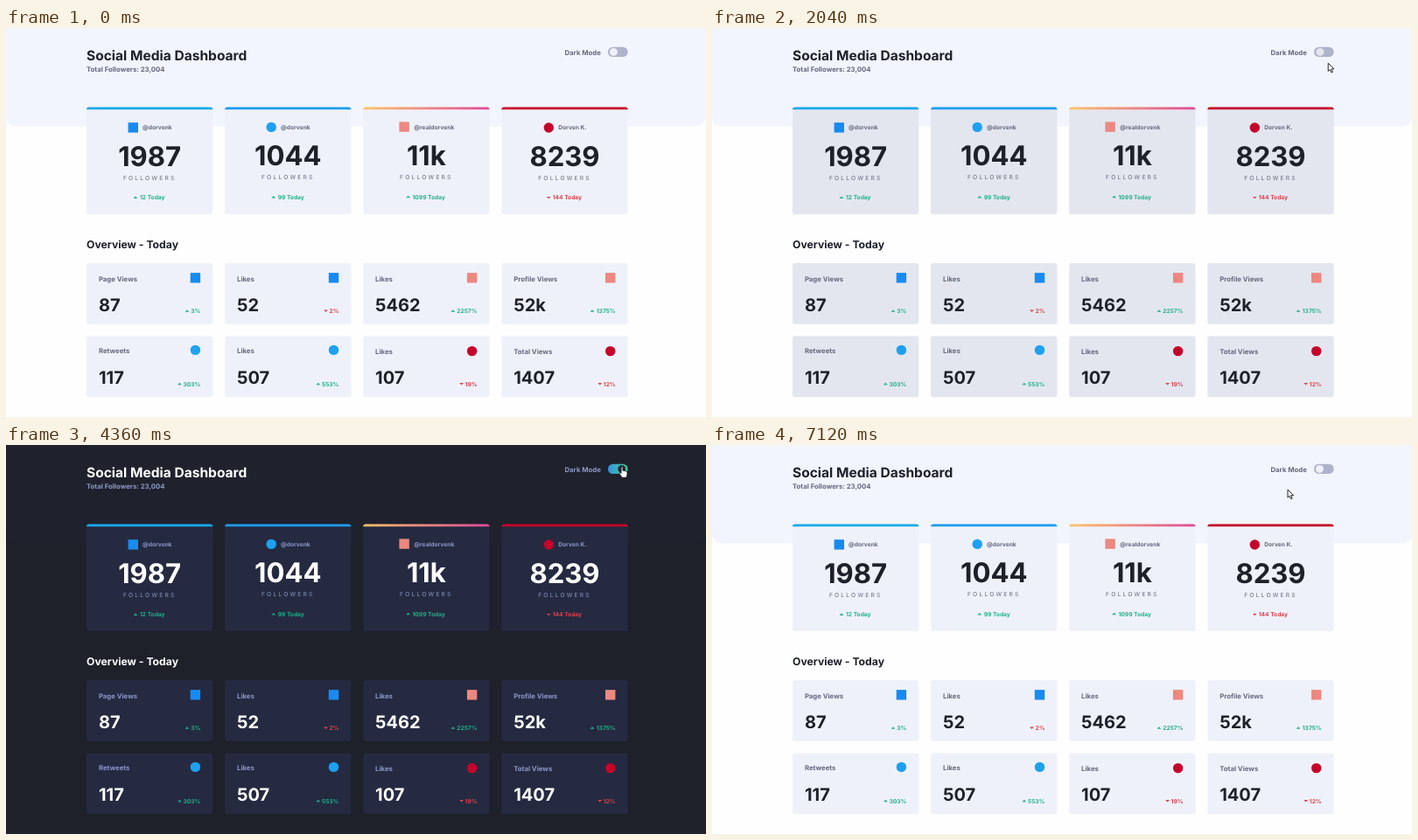
An HTML page that plays this animation: 800x445 px, repeating every 7.16 s.

```html
<!DOCTYPE html>
<html lang="en">
<head>
<meta charset="utf-8">
<title>Social Media Dashboard</title>
<style>
  html, body { margin: 0; width: 100%; height: 100%; overflow: hidden; }
  svg {
    display: block; width: 800px; height: 445px;
    font-family: Inter, sans-serif; font-weight: 700;
    text-rendering: geometricPrecision;
    --page: #fefdff; --top: #f3f5fe; --ink: #1e202a; --text: #63687e; --track: #aeb3cb;
    --up: #1fb088; --down: #dc414c;
  }
  svg.dark {
    --page: #1e202a; --top: #1f212c; --ink: #fff; --text: #8b98c9; --track: url(#trackFill);
  }
  .page { fill: var(--page); }
  .top { fill: var(--top); }
  .ink { fill: var(--ink); }
  .text { fill: var(--text); }
  .track { fill: var(--track); }
  .up { fill: var(--up); }
  .down { fill: var(--down); }
  .surface { fill: var(--surface); }
  .thin { font-weight: 400; letter-spacing: 2.22px; }
  .cursor path { fill: #fff; stroke: #111; stroke-width: .9; stroke-linejoin: round; }
</style>
</head>
<body>
<svg id="stage" viewBox="0 0 800 445">
  <defs>
    <linearGradient id="trackFill">
      <stop offset="0" stop-color="#378fe6"/><stop offset="1" stop-color="#3eda82"/>
    </linearGradient>
    <linearGradient id="warm">
      <stop offset="0" stop-color="#fdc468"/><stop offset="1" stop-color="#df4996"/>
    </linearGradient>
  </defs>
</svg>
<script>
const LOOP = 7160, FADE = 300;
const CLICKS = [1011, 1830, 2736, 4400];
const LIGHT = [239, 241, 250], DARK = [37, 42, 65];
const COLS = [92, 250.1, 408.2, 566.3], CARD_W = 144.3;

// time, x, y of the pointer tip
const PATH = [
  [300, 803, 4], [560, 752, 18], [840, 710, 26], [1080, 708, 26], [1640, 708, 27],
  [1840, 705, 37], [2120, 704, 41], [2400, 705, 38], [2640, 706, 28], [2760, 706.5, 28],
  [3200, 707, 23], [3700, 707, 23], [4400, 704, 25], [4720, 704, 25], [5700, 704, 25],
  [6480, 702, 28], [6800, 682, 42], [7120, 658, 51], [7160, 658, 51]
];

const stage = document.getElementById('stage');

function add(tag, attrs, parent = stage) {
  const el = document.createElementNS('http://www.w3.org/2000/svg', tag);
  for (const key in attrs) el.setAttribute(key, attrs[key]);
  parent.appendChild(el);
  return el;
}

function label(x, y, size, str, cls, anchor = 'start') {
  add('text', { x, y, 'font-size': size, class: cls, 'text-anchor': anchor }).textContent = str;
}

function marker(x, y, dir) {
  const s = dir === 'up' ? -1 : 1;
  add('path', { d: `M${x - 2.4} ${y - s * 1.1}h4.8l-2.4 ${s * 2.4}z`, class: dir });
}

const BRANDS = {
  a: { shape: 'square', color: '#178bf2', bar: '#18a9ea' },
  b: { shape: 'circle', color: '#1da1f2', bar: '#1d9df0' },
  c: { shape: 'square', color: '#ec8880', bar: 'url(#warm)' },
  d: { shape: 'circle', color: '#c4032a', bar: '#c4032a' }
};

function badge(cx, cy, brand) {
  const { shape, color } = BRANDS[brand];
  if (shape === 'circle') add('circle', { cx, cy, r: 5.7, fill: color });
  else add('rect', { x: cx - 5.7, y: cy - 5.7, width: 11.4, height: 11.4, fill: color });
}

function card(x, y, height) {
  add('rect', { x, y, width: CARD_W, height, rx: 2.8, class: 'surface' });
}

function header() {
  add('rect', { width: 800, height: 445, class: 'page' });
  add('rect', { y: -20, width: 800, height: 132.5, rx: 11, class: 'top' });
  label(92, 36.8, 15.56, 'Social Media Dashboard', 'ink');
  label(92, 50.2, 7.78, 'Total Followers: 23,004', 'text');
  label(638.5, 30.6, 7.78, 'Dark Mode', 'text');
  add('rect', { x: 688, y: 21.7, width: 22.6, height: 11.4, rx: 5.7, class: 'track' });
}

// brand, badge x, handle x, handle, count, marker x, change x, change, direction, y shift
const FOLLOWERS = [
  ['a', 145.3, 156, '@dorvenk', '1987', 148, 153, '12 Today', 'up', .5],
  ['b', 303.2, 314, '@dorvenk', '1044', 305.8, 310.7, '99 Today', 'up', 0],
  ['c', 455.1, 466.3, '@realdorvenk', '11k', 459.6, 464.5, '1099 Today', 'up', -.3],
  ['d', 620.3, 631.2, 'Dorven K.', '8239', 620.2, 624.7, '144 Today', 'down', .6]
];

function followerCard([brand, bx, hx, handle, count, mx, cx, change, dir, dy], i) {
  const x = COLS[i], mid = x + CARD_W / 2;
  card(x, 90.6, 122.4);
  add('path', {
    d: `M${x} 93.3a2.8 2.8 0 0 1 2.8 -2.8h${CARD_W - 5.6}a2.8 2.8 0 0 1 2.8 2.8z`,
    fill: BRANDS[brand].bar
  });
  badge(bx, 113.4 + dy, brand);
  label(hx, 115.8 + dy, 6.67, handle, 'text');
  label(mid, 157 + dy, 31.1, count, 'ink', 'middle');
  label(mid, 173.4 + dy, 6.67, 'FOLLOWERS', 'text thin', 'middle');
  marker(mx, 193.4 + dy, dir);
  label(cx, 195.8 + dy, 6.67, change, dir);
}

// title, brand, value, marker x, change, direction
const OVERVIEW = [
  ['Page Views', 'a', '87', 207, '3%', 'up'],
  ['Likes', 'a', '52', 365.5, '2%', 'down'],
  ['Likes', 'c', '5462', 510.9, '2257%', 'up'],
  ['Profile Views', 'c', '52k', 670, '1375%', 'up'],
  ['Retweets', 'b', '117', 198.4, '303%', 'up'],
  ['Likes', 'b', '507', 356.8, '553%', 'up'],
  ['Likes', 'd', '107', 520.6, '19%', 'down'],
  ['Total Views', 'd', '1407', 678.7, '12%', 'down']
];

function overviewCard([title, brand, value, mx, change, dir], i) {
  const x = COLS[i % 4], y = i < 4 ? 269 : 352.5, right = x + CARD_W - 14;
  const dy = brand === 'd' ? 1.2 : 0;
  const titleY = i < 4 ? 289.8 : 371.8 + dy;
  card(x, y, 69.8);
  label(x + 13.9, titleY, 7.78, title, 'text');
  badge(right - 5.9, i < 4 ? 285.8 : 368.4 + dy, brand);
  label(x + 13.9, y + 54.5, 20, value, 'ink');
  marker(mx, y + 54.6, dir);
  label(right, y + 57, 6.67, change, dir, 'end');
}

header();
FOLLOWERS.forEach(followerCard);
label(92, 252.4, 12.2, 'Overview - Today', 'ink');
OVERVIEW.forEach(overviewCard);
const knob = add('circle', { cy: 27.4, r: 4.5, class: 'surface' });

const cursor = add('g', { class: 'cursor' });
const arrow = add('path', { d: 'M0 0V9.2L2.1 7.3L3.6 10.7L5.2 10L3.7 6.7H6.6Z' }, cursor);
const hand = add('path', {
  d: 'M-1 .8C-1 -.5 1 -.5 1 .8V4.6C1.4 3.9 2.6 4 2.7 4.9C3.2 4.3 4.3 4.5 4.4 5.3' +
     'C5 4.9 6 5.2 6 6.1V8.8C6 10 5.2 10.8 5.2 12.3H-.2C-.3 11 -2.6 8.9 -3.1 7.4' +
     'C-3.3 6.4 -2.2 6.1 -1.6 6.8L-1 7.5Z'
}, cursor);

// cubic-bezier(.25, .1, .25, 1)
function ease(x) {
  const bez = (a, b, s) => 3 * a * s * (1 - s) ** 2 + 3 * b * s * s * (1 - s) + s ** 3;
  let lo = 0, hi = 1;
  for (let i = 0; i < 24; i++) {
    const mid = (lo + hi) / 2;
    if (bez(.25, .25, mid) < x) lo = mid; else hi = mid;
  }
  return bez(.1, 1, lo);
}

function pointerAt(t) {
  const i = PATH.findIndex(p => p[0] > t);
  const [t0, x0, y0] = PATH[i - 1], [t1, x1, y1] = PATH[i];
  const u = (t - t0) / (t1 - t0), k = u * u * (3 - 2 * u);
  return [x0 + (x1 - x0) * k, y0 + (y1 - y0) * k];
}

function render(t) {
  const done = CLICKS.filter(c => c <= t);
  const dark = done.length % 2 === 1;
  const p = done.length ? ease(Math.min(1, (t - done[done.length - 1]) / FADE)) : 1;
  const mix = dark ? p : 1 - p;

  stage.classList.toggle('dark', dark);
  const rgb = LIGHT.map((c, i) => Math.round(c + (DARK[i] - c) * mix));
  stage.style.setProperty('--surface', `rgb(${rgb})`);
  knob.setAttribute('cx', 694.4 + 9.4 * mix);

  const visible = t >= PATH[0][0];
  cursor.style.display = visible ? '' : 'none';
  if (!visible) return;
  const [x, y] = pointerAt(t);
  const over = x > 687 && x < 711 && y > 21 && y < 33.5;
  cursor.setAttribute('transform', `translate(${x.toFixed(2)} ${y.toFixed(2)})`);
  hand.style.display = over ? '' : 'none';
  arrow.style.display = over ? 'none' : '';
}

const start = performance.now();
function tick() {
  render((performance.now() - start) % LOOP);
  requestAnimationFrame(tick);
}
tick();
</script>
</body>
</html>
```
